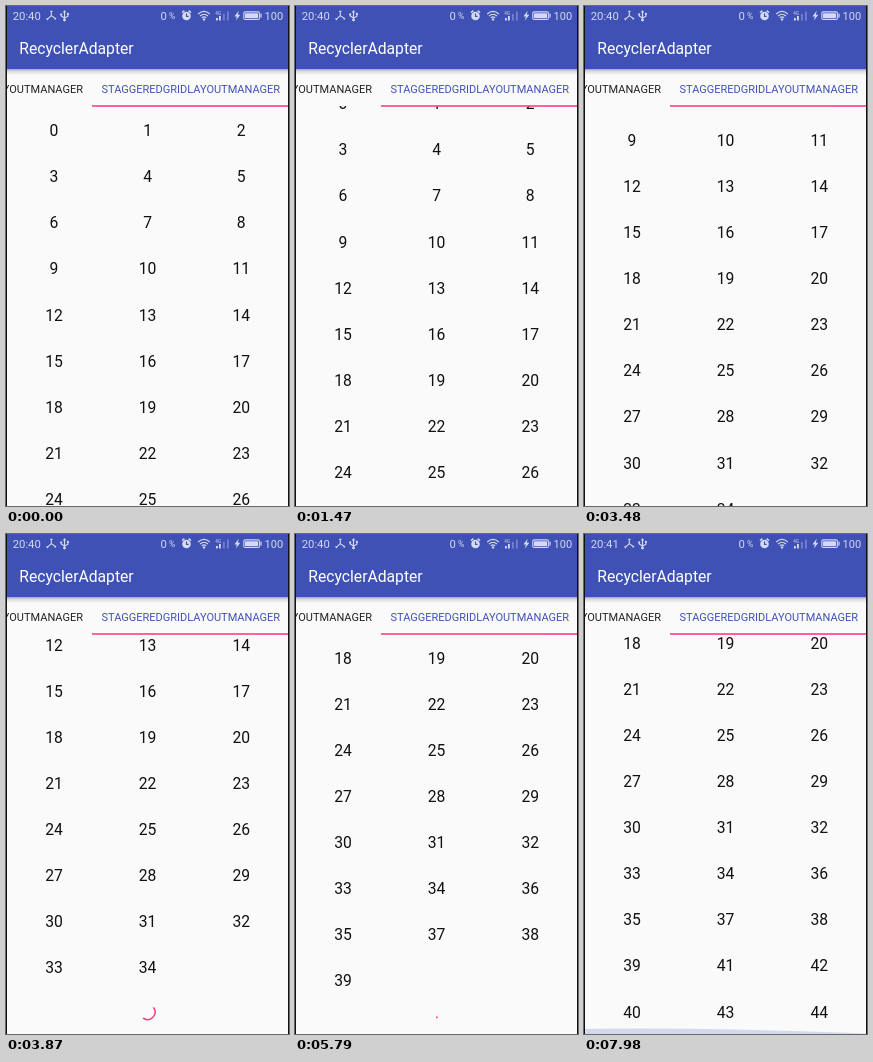
Write an HTML page that moves like this. It is 283 px wide and 500 px high and loops after 8 s.

```html
<!DOCTYPE html>
<html lang="en">
<head>
<meta charset="utf-8">
<title>RecyclerAdapter</title>
<style>
  html, body { margin: 0; width: 100%; height: 100%; overflow: hidden; background: #fafafa; }
  svg { display: block; width: 283px; height: 500px; font-family: Roboto, sans-serif; }
</style>
</head>
<body>
<svg id="stage" viewBox="0 0 283 500">
  <defs>
    <linearGradient id="shade" x2="0" y2="1">
      <stop offset="0" stop-color="#000" stop-opacity=".34"/>
      <stop offset=".4" stop-color="#000" stop-opacity=".12"/>
      <stop offset="1" stop-color="#000" stop-opacity="0"/>
    </linearGradient>
    <clipPath id="listClip"><rect x="1" y="100" width="281" height="400"/></clipPath>
  </defs>

  <rect width="283" height="500" fill="#fafafa"/>
  <g clip-path="url(#listClip)">
    <g id="list" font-size="15.7" fill="#111" text-anchor="middle"></g>
    <path id="spin" fill="none" stroke="#ff4081" stroke-width="1.6" stroke-linecap="square"/>
    <path id="glow" fill="#3f51b5" fill-opacity=".2"/>
  </g>

  <g font-size="11">
    <text x="77" y="86.5" text-anchor="end" fill="#212121">GRIDLAYOUTMANAGER</text>
    <text x="95.5" y="86.5" fill="#3f51b5">STAGGEREDGRIDLAYOUTMANAGER</text>
  </g>
  <rect x="86" y="99.2" width="196" height="1.6" fill="#ff4081"/>

  <rect y="63" width="283" height="6" fill="url(#shade)"/>
  <rect width="283" height="63" fill="#3f51b5"/>
  <text x="13.3" y="47.6" font-size="15.7" fill="#fff">RecyclerAdapter</text>

  <g fill="#d5daf0" font-size="11.3">
    <text id="clock" x="6.7" y="13.7"></text>
    <text x="154.6" y="13.7">0</text>
    <text x="163" y="12.6" font-size="8.5">%</text>
    <text x="258.6" y="13.7" font-size="11">100</text>
    <text x="209.3" y="8.6" font-size="4.6">4G</text>
    <path d="M232.7 4.8 L228.4 10.4 H230.9 L229.9 14.6 L234.3 8.8 H231.8 Z"/>
    <rect x="239" y="7.2" width="13" height="5" rx=".6"/>
    <rect x="254.4" y="7.6" width="1.2" height="4"/>
    <path d="M210 14.5 V12 h1.8 v2.5 Z M213 14.5 V10 h1.8 v4.5 Z"/>
    <path d="M217 14.5 V8 h1.8 v6.5 Z M221 14.5 V5.5 h1.8 v9 Z" opacity=".35"/>
    <circle cx="180.5" cy="10" r="4.3"/>
    <circle cx="198" cy="13.4" r="1.2"/>
    <circle cx="58.5" cy="14" r="1.4"/>
    <path d="M58.5 4 l1.7 2.6 h-3.4 Z"/>
    <rect x="60.9" y="6.9" width="2" height="2"/>
    <circle cx="55.2" cy="8.4" r="1.1"/>
  </g>
  <g fill="none" stroke="#d5daf0" stroke-width="1.1">
    <rect x="237.8" y="5.9" width="15.6" height="7.6" rx="1.4"/>
    <path d="M176 6.6 l2.4 -2 M185 6.6 l-2.4 -2" stroke-width="1.4"/>
    <path d="M180.5 7.4 V10.4 H182.6" stroke="#3f51b5"/>
    <path d="M192.2 8 Q198 2.8 203.8 8 M194 10 Q198 6.4 202 10 M195.8 11.8 Q198 9.8 200.2 11.8"/>
    <path d="M58.5 6 V14 M55.2 8.4 V10 L58.5 12 L61.9 10.2 V8.5"/>
    <path d="M45.3 5 V9.6 L41 13.6 M45.3 9.6 L49.6 12.8 M40.4 12.4 l1.6 1.6 M48.8 13.6 l1.2 -1.6 M44.2 5.4 h2.2"/>
  </g>

  <rect width="1" height="500" fill="#111"/>
  <rect x="282" width="1" height="500" fill="#111"/>
</svg>
<script>
const LOOP = 8000, ROW = 46.1, TOP = 130.1;
const $ = id => document.getElementById(id);
const clamp = v => Math.max(0, Math.min(1, v));

// time, list offset
const scroll = [
  [0, 0], [1205, 0], [1350, 9], [1470, 26.6], [1590, 66], [1710, 98], [1790, 105.6],
  [3370, 105.6], [3480, 128.3], [3570, 160], [3690, 192], [3760, 197.7],
  [5585, 197.7], [5700, 233], [5790, 276.6], [5850, 289.8],
  [7635, 289.8], [7740, 292], [8000, 292]
];
// spinner start, fade-out start, fade-in of new items, list offset at rest
const loads = [
  { from: 1590, out: 2710, add: 2850, stop: 105.6 },
  { from: 3620, out: 4870, add: 4995, stop: 197.7 },
  { from: 5780, out: 6960, add: 7085, stop: 289.8 }
];
const tail = [36, 35, 37, 38, 39, 41, 42, 40, 43, 44];

const slope = i => {
  const a = scroll[i], b = scroll[i + 1];
  return a && b ? (b[1] - a[1]) / (b[0] - a[0]) : 0;
};
const tangent = i => {
  const a = i ? slope(i - 1) : 0, b = slope(i);
  return a * b > 0 ? 2 * a * b / (a + b) : 0;
};
function offsetAt(t) {
  let i = 0;
  while (i < scroll.length - 2 && t >= scroll[i + 1][0]) i++;
  const [t0, s0] = scroll[i], [t1, s1] = scroll[i + 1];
  const d = t1 - t0, u = (t - t0) / d, v = 1 - u;
  return s0 * (1 + 2 * u) * v * v + s1 * u * u * (3 - 2 * u)
    + d * u * v * (tangent(i) * v - tangent(i + 1) * u);
}

// cubic-bezier(.4, 0, .2, 1)
function ease(x) {
  let lo = 0, hi = 1;
  for (let i = 0; i < 20; i++) {
    const m = (lo + hi) / 2, n = 1 - m;
    if (1.2 * m * n * n + 0.6 * m * m * n + m * m * m < x) lo = m; else hi = m;
  }
  return lo * lo * (3 - 2 * lo);
}

const items = [];
for (let slot = 0; slot < 45; slot++) {
  const n = slot < 35 ? slot : tail[slot - 35];
  const el = document.createElementNS("http://www.w3.org/2000/svg", "text");
  el.textContent = n;
  el.setAttribute("x", 48 + 93.6 * (slot % 3));
  el.setAttribute("y", TOP + ROW * Math.floor(slot / 3));
  $("list").append(el);
  if (n >= 30) items.push({ el, load: loads[Math.floor((n - 30) / 5)] });
}

function drawSpinner(t, offset) {
  const load = loads.find(l => t >= l.from && t < l.out + 110);
  if (!load) return $("spin").setAttribute("d", "");
  const age = t - load.from, p = age / 1333 % 1;
  const turn = 0.25 * p + age / 2222;
  const a = (0.75 * ease(clamp(2 * p - 1)) + turn) * 2 * Math.PI;
  const b = (0.75 * ease(clamp(2 * p)) + turn) * 2 * Math.PI + 0.01;
  const y = 478 + load.stop - offset, r = 7.5;
  const at = q => `${(141.5 + r * Math.sin(q)).toFixed(3)} ${(y - r * Math.cos(q)).toFixed(3)}`;
  $("spin").setAttribute("d", `M${at(a)} A${r} ${r} 0 ${b - a > Math.PI ? 1 : 0} 1 ${at(b)}`);
  $("spin").setAttribute("opacity", 1 - clamp((t - load.out) / 110));
}

function draw(t) {
  const offset = offsetAt(t);
  $("list").setAttribute("transform", `translate(0 ${-offset})`);
  for (const { el, load } of items) el.setAttribute("opacity", clamp((t - load.add) / 110));
  drawSpinner(t, offset);
  const g = clamp((t - 7720) / 260);
  $("glow").setAttribute("d", g
    ? `M1 500 V${500 - 5 * g} Q110 ${500 - 7 * g} 282 ${500 - 0.6 * g} V500 Z` : "");
  $("clock").textContent = t < 6000 ? "20:40" : "20:41";
}

const begin = performance.now();
function tick() {
  draw((performance.now() - begin) % LOOP);
  requestAnimationFrame(tick);
}
draw(0);
requestAnimationFrame(tick);
</script>
</body>
</html>
```
